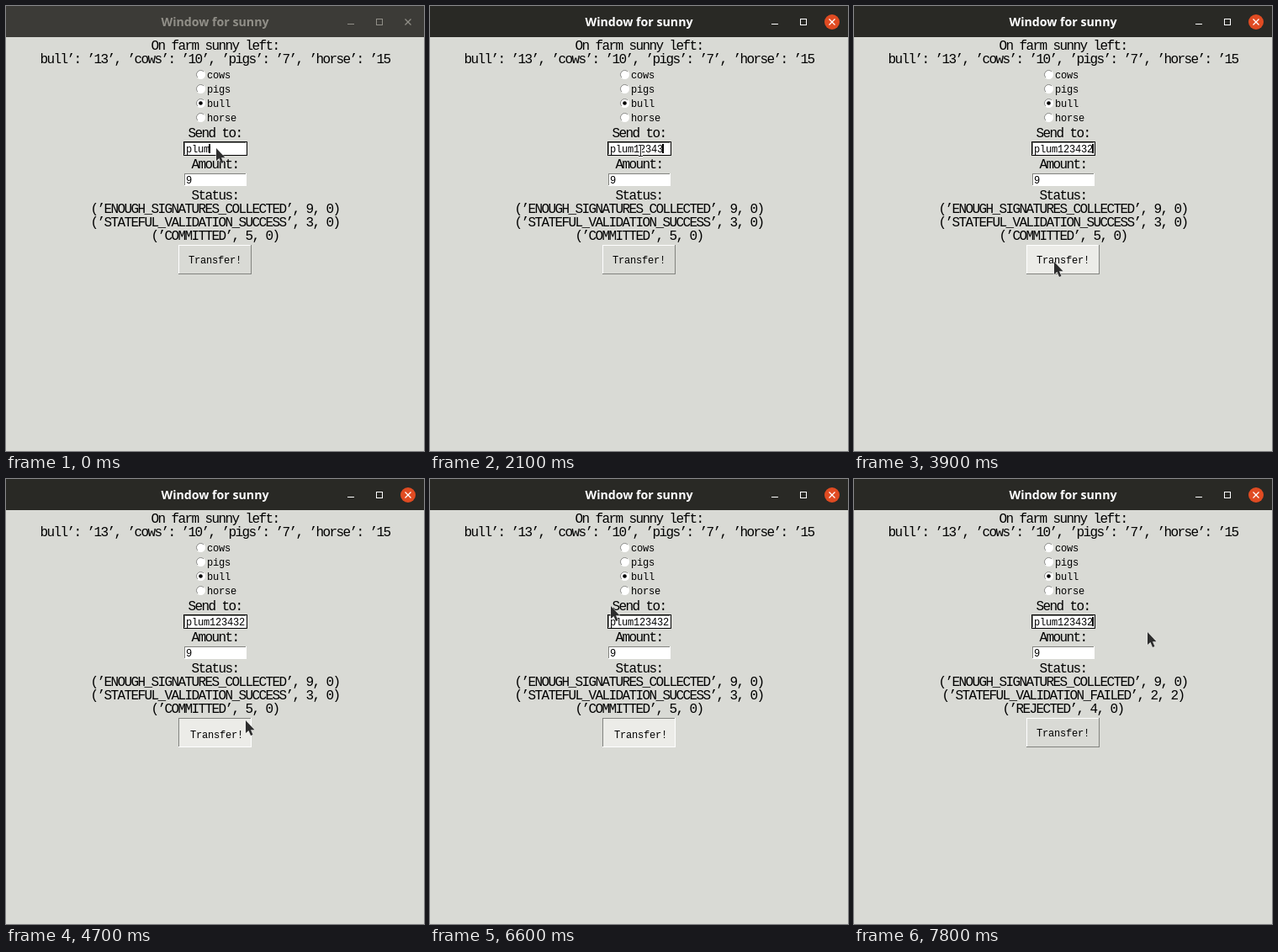
An HTML page with a canvas that plays this animation: 497 by 529 pixels, repeating every 8000 ms.

```html
<!DOCTYPE html>
<html lang="en">
<head>
<meta charset="utf-8">
<title>Window for sunny</title>
<style>
html, body { margin: 0; width: 497px; height: 529px; overflow: hidden; }
canvas { display: block; }
</style>
</head>
<body>
<canvas id="stage" width="497" height="529"></canvas>
<script>
const ctx = document.getElementById('stage').getContext('2d');
const LOOP = 8000, STEP = 100, BLINK = 300;
const PRESS = 4100, REPLY = 7500;
const FACE = '#d9dad5', ACTIVE = '#ecece8', SHADOW = '#82837f';

// Pointer moves: from time, to time, destination
const MOVES = [
  [2900, 3300, 268, 302], [3300, 3600, 250, 319], [3600, 3900, 238, 304],
  [4600, 4700, 285, 287], [4700, 5000, 304, 288], [5500, 6000, 252, 209],
  [6000, 6600, 215, 151], [6600, 7300, 253, 160], [7300, 7600, 268, 191],
  [7700, 7800, 349, 182]
];
// One more character shows after each of these times
const KEYS = [800, 1200, 1200, 1900, 2100, 2700];

function rect(x, y, w, h, color) {
  ctx.fillStyle = color;
  ctx.fillRect(x, y, w, h);
}

function text(str, x, y, size, advance) {
  ctx.font = `${size}px "Liberation Mono", monospace`;
  ctx.letterSpacing = `${advance - size * 0.6}px`;
  ctx.fillStyle = '#000';
  ctx.textAlign = 'left';
  ctx.fillText(str, x, y);
}
const small = (str, x, y) => text(str, x, y, 12, 7);
const label = (str, y) => text(str.replaceAll("'", '’'), 248.5 - str.length * 4, y, 16, 8);

function line(color, width, ...points) {
  ctx.strokeStyle = color;
  ctx.lineWidth = width;
  ctx.beginPath();
  points.forEach(([x, y]) => ctx.lineTo(x, y));
  ctx.stroke();
}

function disc(x, y, r, color) {
  ctx.fillStyle = color;
  ctx.beginPath();
  ctx.arc(x, y, r, 0, 7);
  ctx.fill();
}

function bevel(x, y, w, h, light, dark, fill) {
  rect(x, y, w, h, dark);
  rect(x, y, w - 1, h - 1, light);
  rect(x + 1, y + 1, w - 2, h - 2, fill);
}

function titleBar(focused) {
  const ink = focused ? '#fff' : '#918f88';
  rect(0, 0, 497, 37, focused ? '#292925' : '#3c3b37');
  ctx.font = 'bold 14.2px "Noto Sans", sans-serif';
  ctx.letterSpacing = '0px';
  ctx.textAlign = 'center';
  ctx.fillStyle = ink;
  ctx.fillText('Window for sunny', 248.5, 24);
  rect(406, 21, 8, 1, ink);
  ctx.strokeStyle = ink;
  ctx.lineWidth = 1;
  ctx.strokeRect(440.5, 15.5, 7, 7);
  if (focused) disc(478, 19, 9, '#e04b22');
  line(ink, 1.2, [474.5, 15.5], [481.5, 22.5]);
  line(ink, 1.2, [481.5, 15.5], [474.5, 22.5]);
}

function radio(name, y, selected) {
  disc(231.5, y, 5.5, '#fff');
  ctx.strokeStyle = SHADOW;
  ctx.lineWidth = 1;
  ctx.beginPath();
  ctx.arc(231.5, y, 5, Math.PI * 0.75, Math.PI * 1.75);
  ctx.stroke();
  if (selected) disc(231.5, y, 2.3, '#000');
  small(name, 239, y + 4.5);
}

function entry(y, value, focused) {
  rect(211, y, 76, 17, focused ? '#000' : FACE);
  bevel(212, y + 1, 74, 15, SHADOW, '#fff', '#fff');
  small(value, 214, y + 13);
}

function pointerAt(t) {
  let x = 250, y = 169;
  for (const [from, to, endX, endY] of MOVES) {
    const k = Math.min(1, Math.max(0, (t - from) / (to - from)));
    x += (endX - x) * k;
    y += (endY - y) * k;
  }
  return [Math.round(x), Math.round(y)];
}

const inside = (x, y, left, top, w, h) =>
  x >= left && x < left + w && y >= top && y < top + h;

function arrow(x, y) {
  ctx.save();
  ctx.translate(x, y);
  ctx.beginPath();
  [[0, 0], [0, 15], [3.5, 12], [6, 18], [8.5, 17], [6, 11.3], [10.5, 11.3]]
    .forEach(([px, py]) => ctx.lineTo(px, py));
  ctx.closePath();
  ctx.lineWidth = 1;
  ctx.strokeStyle = '#f0f0f0';
  ctx.stroke();
  ctx.fillStyle = '#2d2d2d';
  ctx.fill();
  ctx.restore();
}

function iBeam(x, y) {
  for (const [color, width] of [['#fff', 3], ['#222', 1]]) {
    line(color, width, [x + 0.5, y - 6], [x + 0.5, y + 6]);
    for (const end of [-7, 6])
      line(color, width, [x - 2, y + end + 0.5], [x + 3, y + end + 0.5]);
  }
}

function draw(t) {
  const [mx, my] = pointerAt(t);
  const rejected = t >= REPLY;
  const pressed = t >= PRESS && !rejected;
  const hover = pressed || inside(mx, my, 205, 284, 87, 35);

  rect(0, 0, 497, 529, FACE);
  titleBar(t >= STEP);

  label('On farm sunny left:', 52);
  label("bull': '13', 'cows': '10', 'pigs': '7', 'horse': '15", 68);
  ['cows', 'pigs', 'bull', 'horse'].forEach((name, i) =>
    radio(name, 81.5 + i * 17, name === 'bull'));

  label('Send to:', 156);
  const pressedKeys = KEYS.filter(at => at <= t);
  const count = 4 + pressedKeys.length;
  entry(161, 'plum123432'.slice(0, count), true);
  // The caret blinks from the last key on and stands still while the form waits
  const sinceKey = t - (pressedKeys.at(-1) ?? BLINK);
  if (rejected || (!pressed && sinceKey % (2 * BLINK) < BLINK))
    rect(213 + 7 * count, 164, 2, 11, '#000');

  label('Amount:', 193);
  entry(198, '9', false);

  label('Status:', 230);
  label("('ENOUGH_SIGNATURES_COLLECTED', 9, 0)", 246);
  label(rejected ? "('STATEFUL_VALIDATION_FAILED', 2, 2)" : "('STATEFUL_VALIDATION_SUCCESS', 3, 0)", 262);
  label(rejected ? "('REJECTED', 4, 0)" : "('COMMITTED', 5, 0)", 278);

  const edges = pressed ? [SHADOW, '#fff'] : ['#fff', SHADOW];
  bevel(205, 284, 87, 35, ...edges, hover ? ACTIVE : FACE);
  const shift = pressed ? 2 : 0;
  small('Transfer!', 217 + shift, 306 + shift);

  const overEntry = [161, 198].some(top => inside(mx, my, 211, top, 76, 17));
  if (t >= STEP && t < 2900) iBeam(250, 172);
  else if (t > PRESS && t < 6400 && overEntry) iBeam(mx, my);
  else arrow(mx, my);
}

const start = performance.now();
function tick() {
  const t = (performance.now() - start) % LOOP;
  draw(Math.floor(t / STEP) * STEP);
  requestAnimationFrame(tick);
}
tick();
</script>
</body>
</html>
```
